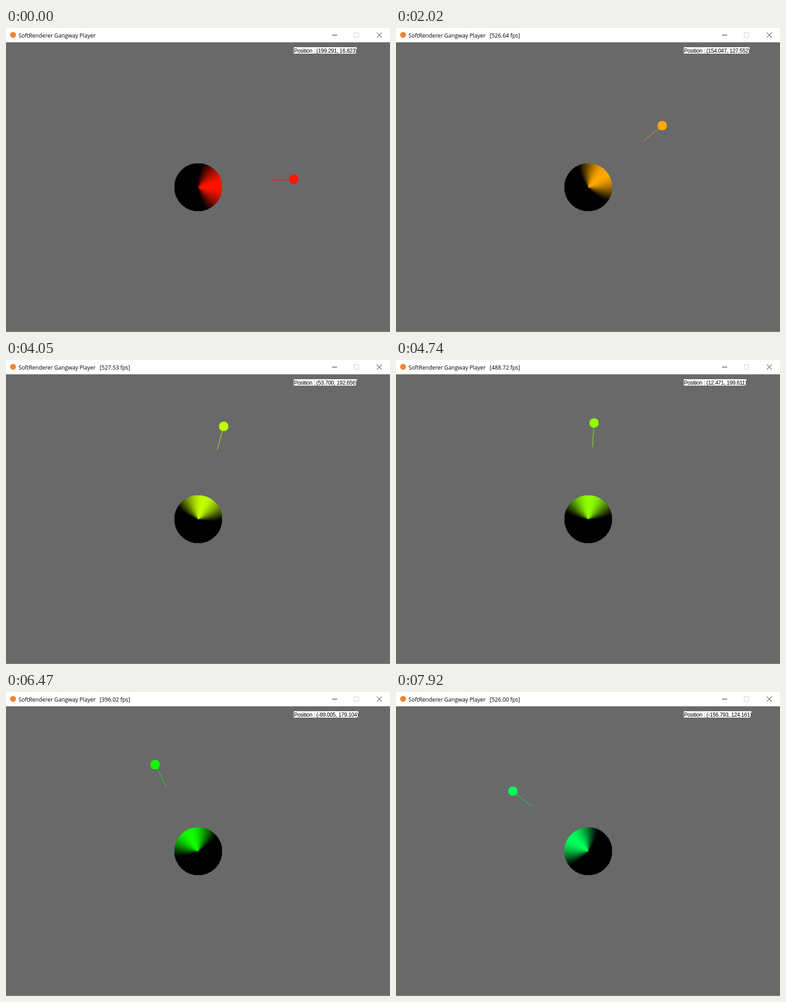
An HTML page with a canvas for the animation above (7.99 s loop, 842 by 665 pixels).

```html
<!DOCTYPE html>
<html lang="en">
<head>
<meta charset="utf-8">
<title>Orbiting light</title>
<style>
  html, body { margin: 0; width: 100%; height: 100%; overflow: hidden; background: #696969; }
  canvas { display: block; }
</style>
</head>
<body>
<canvas id="stage" width="842" height="665"></canvas>
<script>
const WIDTH = 842, HEIGHT = 665, BAR = 32;
const LOOP = 7990, STEPS = 115;
const GREY = '#696969', EDGE = '#8f9994';
const ORBIT = 200, DISC = 50, BULB = 10, RAY = 50;
const RADIAN = Math.PI / 180;
const START_ANGLE = 4.825 * RADIAN, STEP_ANGLE = 1.2 * RADIAN;

// The scene is rasterised at 800 x 600 and enlarged to the window.
const ctx = document.getElementById('stage').getContext('2d');
const scene = Object.assign(document.createElement('canvas'), { width: 800, height: 600 });
const pixels = scene.getContext('2d');
const SCALE = WIDTH / scene.width;

const clamp01 = v => Math.min(1, Math.max(0, v));

function random(seed) {
  const v = Math.sin(seed * 12.9898) * 43758.5453;
  return v - Math.floor(v);
}

// Mostly steady, with a rare deep dip.
const frameRate = step => 530 - 8 * random(step) - 180 * random(step + 0.5) ** 12;

function hueColor(angle) {
  const sextant = angle * 3 / Math.PI;
  return [0, 4, 2].map(shift => 255 * clamp01(Math.abs((sextant + shift) % 6 - 3) - 1));
}

function plot(x, y, color) {
  pixels.fillStyle = color;
  pixels.fillRect(Math.floor(400 + x), Math.floor(300 - y), 1, 1);
}

function fillDisc(cx, cy, radius, colorAt) {
  for (let y = 1 - radius; y < radius; y++)
    for (let x = 1 - radius; x < radius; x++)
      if (x * x + y * y < radius * radius) plot(cx + x, cy + y, colorAt(x, y));
}

function drawScene(angle) {
  const rgb = hueColor(angle);
  const shade = light => `rgb(${rgb.map(c => Math.round(c * light))})`;
  const full = shade(1);
  const dx = Math.cos(angle), dy = Math.sin(angle);
  const lx = ORBIT * dx, ly = ORBIT * dy;

  pixels.fillStyle = GREY;
  pixels.fillRect(0, 0, scene.width, scene.height);

  // Lambert shading by a point light, with normals pointing outwards.
  fillDisc(0, 0, DISC, (x, y) => {
    const tx = lx - x, ty = ly - y;
    const length = Math.hypot(x, y) * Math.hypot(tx, ty);
    return shade(length ? clamp01((tx * x + ty * y) / length) : 1);
  });

  const count = Math.ceil(RAY * Math.max(Math.abs(dx), Math.abs(dy)));
  for (let i = 0; i <= count; i++) {
    const distance = ORBIT - RAY * i / count;
    plot(distance * dx, distance * dy, full);
  }
  fillDisc(lx, ly, BULB, () => full);

  ctx.fillStyle = GREY;
  ctx.fillRect(0, BAR, WIDTH, HEIGHT - BAR);
  ctx.drawImage(scene, 0, BAR, WIDTH, scene.height * SCALE);
}

function drawLabel(angle) {
  const [x, y] = [Math.cos(angle), Math.sin(angle)].map(v => (ORBIT * v).toFixed(3));
  const label = `Position : (${x}, ${y})`;
  ctx.font = '12px "Liberation Sans", Arial, sans-serif';
  ctx.letterSpacing = '-0.33px';
  ctx.fillStyle = '#fff';
  ctx.fillRect(631, 42, ctx.measureText(label).width, 14);
  ctx.fillStyle = '#000';
  ctx.fillText(label, 631.5, 53.5);
  ctx.letterSpacing = '0px';
}

function strokeLine(x0, y0, x1, y1) {
  ctx.beginPath();
  ctx.moveTo(x0, y0);
  ctx.lineTo(x1, y1);
  ctx.stroke();
}

function drawWindow(step) {
  ctx.fillStyle = '#fff';
  ctx.fillRect(0, 0, WIDTH, BAR);
  ctx.fillStyle = EDGE;
  ctx.fillRect(0, BAR - 1, WIDTH, 1);
  ctx.fillRect(0, HEIGHT - 1, WIDTH, 1);

  ctx.fillStyle = '#f08535';
  ctx.beginPath();
  ctx.arc(15.5, 15, 6.5, 0, 2 * Math.PI);
  ctx.fill();

  ctx.fillStyle = '#000';
  ctx.font = '12.2px "Open Sans", "Noto Sans", sans-serif';
  ctx.fillText('SoftRenderer Gangway Player', 27.5, 21);
  if (step > 0) ctx.fillText(`[${frameRate(step).toFixed(2)} fps]`, 205.5, 21);

  ctx.lineWidth = 1;
  ctx.strokeStyle = '#000';
  strokeLine(715, 15.5, 726, 15.5);
  strokeLine(813, 10, 824, 21);
  strokeLine(824, 10, 813, 21);
  ctx.strokeStyle = '#ccc';
  ctx.strokeRect(763.5, 10.5, 10, 10);
}

const start = performance.now();
let shown = -1;

function render() {
  const time = (performance.now() - start) % LOOP;
  // The small lead absorbs the rounding of the step length.
  const step = Math.min(STEPS - 1, Math.floor(time * STEPS / LOOP + 0.1));
  if (step !== shown) {
    const angle = START_ANGLE + STEP_ANGLE * step;
    drawScene(angle);
    drawLabel(angle);
    drawWindow(step);
    shown = step;
  }
  requestAnimationFrame(render);
}

render();
</script>
</body>
</html>
```
